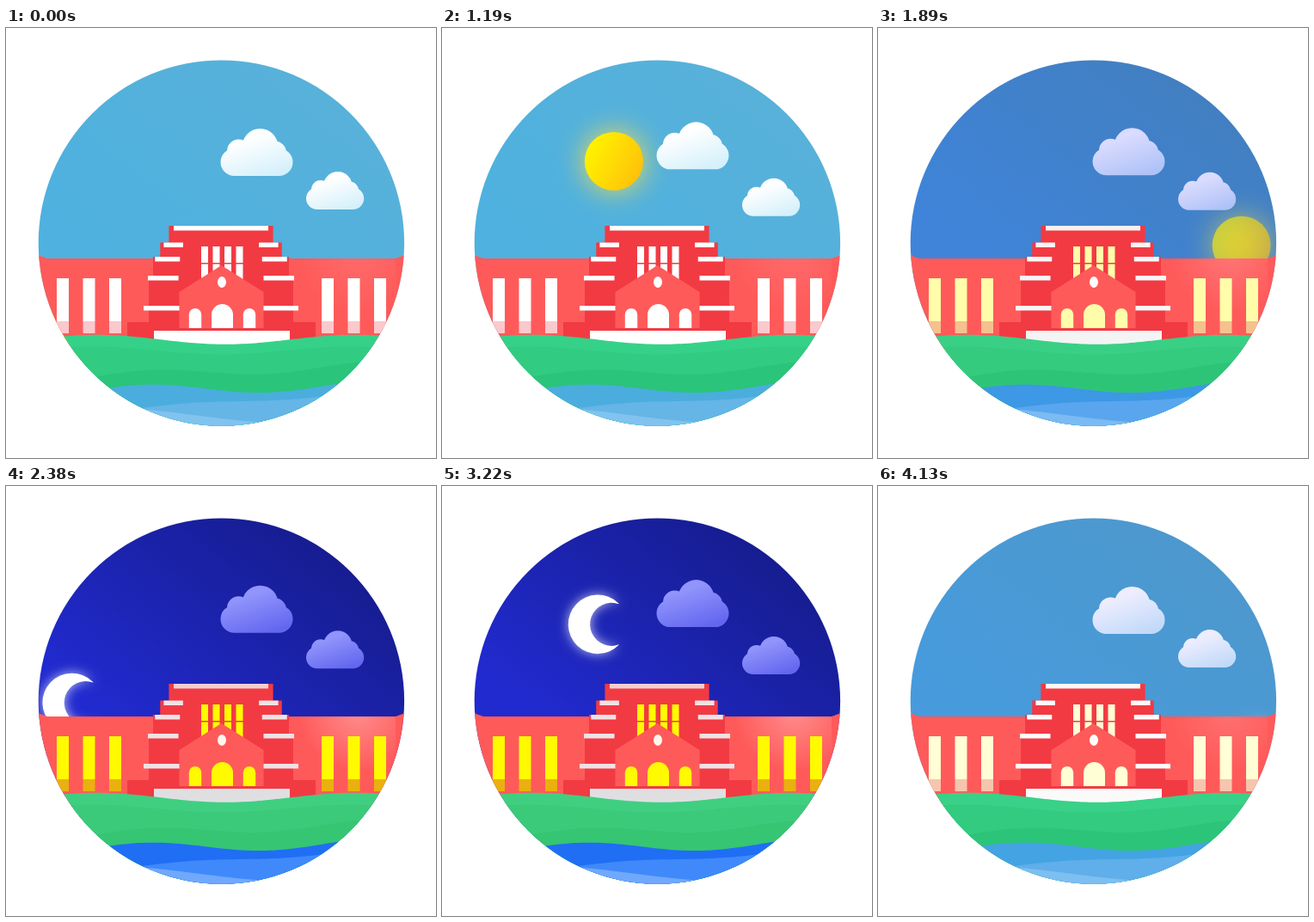
An HTML page with a canvas for the animation above (4.2 s loop, 500 by 500 pixels).

```html
<!DOCTYPE html>
<html>
<head>
<meta charset="utf-8">
<style>
  html, body { margin: 0; width: 100%; height: 100%; overflow: hidden; background: #fff; }
  canvas { display: block; }
</style>
</head>
<body>
<canvas id="stage" width="500" height="500"></canvas>
<script>
const g = document.getElementById('stage').getContext('2d');
const LOOP = 4200, HALF = LOOP / 2, STEP = 70, FADE = 420;
const clamp = v => Math.max(0, Math.min(1, v));
let night = 0;

// Blend a day colour into a night colour
function mix(day, dark) {
  const part = (c, i) => parseInt(c.substr(1 + 2 * i, 2), 16);
  const rgb = [0, 1, 2].map(i => Math.round(part(day, i) + (part(dark, i) - part(day, i)) * night));
  return `rgb(${rgb})`;
}

function stops(grad, from, to) {
  grad.addColorStop(0, from);
  grad.addColorStop(1, to);
  return grad;
}

const blend = (x0, y0, x1, y1, from, to) => stops(g.createLinearGradient(x0, y0, x1, y1), from, to);

function rect(x, y, w, h, fill) {
  g.fillStyle = fill;
  g.fillRect(x, y, w, h);
}

// The same box on both sides of the centre line
function pair(x, y, w, h, fill) {
  rect(x, y, w, h, fill);
  rect(500 - x - w, y, w, h, fill);
}

function poly(points, fill) {
  g.beginPath();
  points.forEach(p => g.lineTo(...p));
  g.fillStyle = fill;
  g.fill();
}

// Area below a cosine swell, lowest at `trough`
function wave(y, swell, trough, length, slope, fill) {
  const points = [[470, 480], [30, 480]];
  for (let x = 30; x <= 470; x += 4)
    points.push([x, y + slope * (x - trough) + swell * Math.cos(2 * Math.PI * (x - trough) / length)]);
  poly(points, fill);
}

// Angle from the zenith: the rise slows down, then eases into a steady fall
function arcAngle(t) {
  const rise = 66 * Math.max(0, 1 - t / 950) ** 2;
  const fall = 0.112 * 75 * Math.log(1 + Math.exp((t - 1077) / 75));
  return (fall - rise - 29) * Math.PI / 180;
}

function orb(t) {
  const a = arcAngle(t % HALF);
  g.save();
  g.translate(249.5 + 196 * Math.sin(a), 344.5 - 196 * Math.cos(a));
  g.beginPath();
  if (t < HALF) {
    g.globalAlpha = (1 - night) ** 1.2;
    g.shadowColor = 'rgba(255,225,70,0.9)';
    g.shadowBlur = 32;
    g.fillStyle = blend(-28, -12, 28, 16, '#fff000', '#ffc30a');
    g.arc(0, 0, 34, 0, 7);
  } else {
    const tip = Math.atan2(23.5, 24.6), cut = Math.atan2(23.5, 8.6);
    g.globalAlpha = night;
    g.shadowColor = 'rgba(255,255,255,0.7)';
    g.shadowBlur = 13;
    g.fillStyle = '#fff';
    g.arc(0, 0, 34.3, tip, -tip);
    g.arc(16, 0, 25, -cut, cut, true);
  }
  g.fill();
  g.restore();
}

// Origin is the left end of the flat base
function cloud(x, y, scale) {
  g.save();
  g.translate(x, y);
  g.scale(scale, scale);
  g.beginPath();
  for (const [cx, cy, r] of [[16, -16, 16], [21, -29, 13.5], [46, -34, 21], [63, -27, 13.5], [68, -16, 16]]) {
    g.moveTo(cx + r, cy);
    g.arc(cx, cy, r, 0, 7);
  }
  g.rect(16, -30, 52, 30);
  g.fillStyle = blend(38, -45, 54, 2, mix('#ffffff', '#9094fb'), mix('#d4f0fb', '#6266f0'));
  g.fill();
  g.restore();
}

function arch(middle, r, top, fill) {
  g.beginPath();
  g.arc(middle, top + r, r, Math.PI, 0);
  g.lineTo(middle + r, 349);
  g.lineTo(middle - r, 349);
  g.fillStyle = fill;
  g.fill();
}

function building() {
  const wall = '#ff5a5a', red = '#f23a43';
  const ledge = mix('#ffffff', '#f0e2e4'), glass = mix('#ffffff', '#fffa00');
  const sill = mix('#fac9cd', '#eab010');

  poly([[37, 264], [48, 268], [453, 268], [464, 264], [464, 375], [37, 375]], wall);
  const shine = stops(g.createRadialGradient(410, 262, 0, 410, 262, 70),
    `rgba(255,255,255,${0.1 + 0.2 * night})`, 'rgba(255,255,255,0)');
  rect(335, 268, 118, 60, shine);
  for (const side of [59, 367])
    for (let i = 0; i < 3; i++) {
      rect(side + 30.5 * i, 291, 14, 50, glass);
      rect(side + 30.5 * i, 341, 14, 14, sill);
    }

  // Stepped tower: each tier is wider than the one above
  const tiers = [230, 249.5, 266, 288, 323, 345];
  const edge = k => 160 + 35 * Math.max(0, 1 - k / 4) ** 1.4;
  rect(141, 342, 219, 33, red);
  for (let k = 0; k < 5; k++) {
    const x = edge(k + 1) + 6;
    rect(x, tiers[k], 500 - 2 * x, tiers[k + 1] - tiers[k] + 1, red);
  }
  for (let k = 1; k < 5; k++) pair(edge(k), tiers[k], 16 + 6.5 * k, 5.5, ledge);
  rect(195, 230, 110, 5.5, mix('#ffffff', '#f2cfd1'));

  for (let i = 0; i < 4; i++) rect(227 + 13.5 * i, 254, 8, 38, glass);
  rect(227, 273, 49, 1.5, red);
  poly([[250.5, 276], [299.5, 307], [299.5, 351], [201.5, 351], [201.5, 307]], wall);
  g.beginPath();
  g.ellipse(251, 295.5, 5, 6.5, 0, 0, 7);
  g.fillStyle = mix('#ffffff', '#fff6ee');
  g.fill();
  arch(220, 7.2, 326, glass);
  arch(251.5, 12.5, 321, glass);
  arch(283, 7.2, 326, glass);
  rect(172, 349, 158, 3, red);
  rect(172, 352, 158, 20, mix('#ffffff', '#dfdfe2'));
}

function land() {
  wave(362.3, 5.5, 255, 300, 0, mix('#36d188', '#40cf80'));
  wave(375, 4.5, 250, 300, 0, mix('#31cb81', '#3bca79'));
  wave(397.5, 5, 300, 260, -0.04, mix('#2ac47a', '#36c573'));
  wave(418, 6, 300, 270, -0.02, mix('#4badde', '#206ef4'));
  wave(430, 2, 330, 230, -0.07, mix('#66b5e7', '#3f89fb'));
  wave(456, 2, 290, 260, 0.08, mix('#80c3ee', '#70a8fc'));
}

function draw(t) {
  night = clamp((t - 1750) / FADE) - clamp((t - LOOP + FADE) / FADE);
  g.clearRect(0, 0, 500, 500);
  g.save();
  g.beginPath();
  g.arc(250.4, 250.1, 212.7, 0, 7);
  g.clip();
  rect(30, 30, 440, 440, blend(150, 290, 345, 40, mix('#4eb1df', '#212ace'), mix('#58b1d9', '#161c8e')));
  orb(t);
  const bob = 4 * Math.cos(2 * Math.PI * t / HALF);
  cloud(249.5, 168 + bob, 1);
  cloud(349, 215 - bob, 0.8);
  building();
  land();
  g.restore();
}

const start = performance.now();
function tick() {
  const t = (performance.now() - start) % LOOP;
  draw(Math.floor(t / STEP) * STEP);
  requestAnimationFrame(tick);
}
tick();
</script>
</body>
</html>
```
